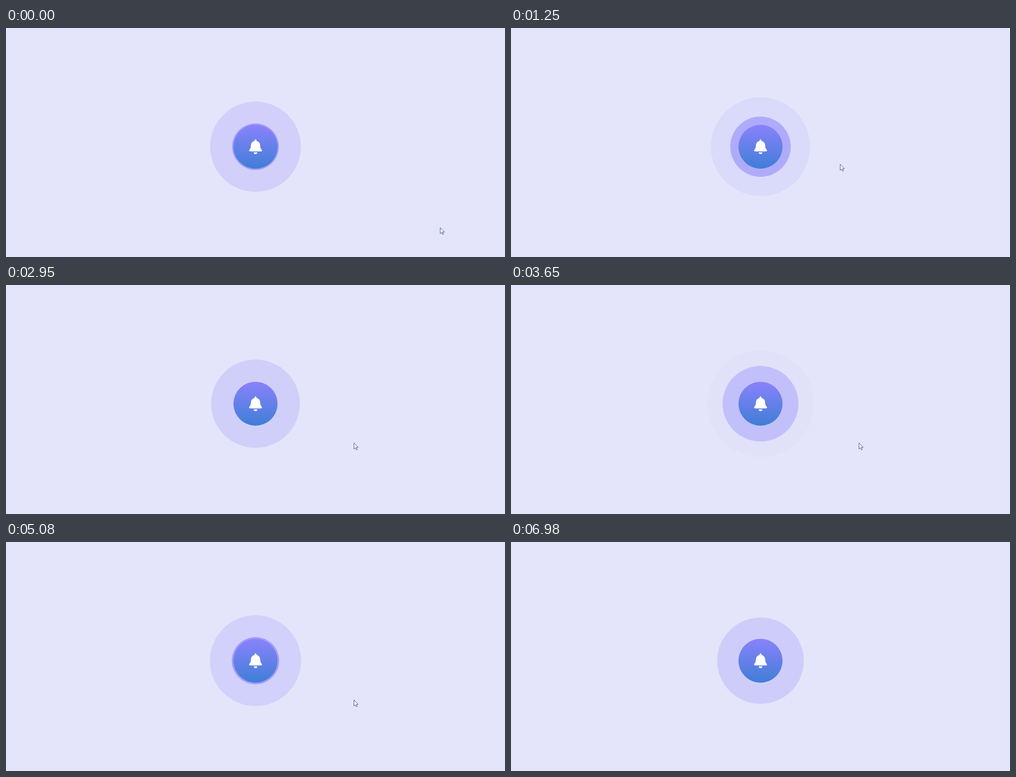
Recreate the animation shown at these times as an HTML page. Size 1102 by 508 pixels, loop 7.05 s.

```html
<!DOCTYPE html>
<html lang="en">
<head>
<meta charset="utf-8">
<title>Notification bell</title>
<style>
  html, body { margin: 0; width: 100%; height: 100%; overflow: hidden; background: #e4e5fa; }
  svg { display: block; width: 100%; height: 100%; }
</style>
</head>
<body>
<svg viewBox="0 0 1102 508">
  <defs>
    <linearGradient id="fill" x1="0" y1="0" x2="0" y2="1">
      <stop offset="0" stop-color="#8a82fb"/>
      <stop offset="1" stop-color="#407ed7"/>
    </linearGradient>
  </defs>
  <rect width="1102" height="508" fill="#e4e5fa"/>
  <g fill="#8a82fb">
    <circle class="pulse" cx="551" cy="263.3"/>
    <circle class="pulse" cx="551" cy="263.3"/>
  </g>
  <circle cx="551" cy="263.3" r="48.6" fill="url(#fill)"/>
  <path fill="#fff" transform="translate(536.8 247.1) scale(.0638)"
    d="M224 512c35 0 64-29 64-64H160c0 35 29 64 64 64z
       M439 362c-19-21-55-52-55-154 0-78-54-140-128-155V32c0-18-14-32-32-32s-32 14-32 32v21
       C118 68 64 130 64 208c0 102-36 133-55 154-6 6-9 14-9 22 0 16 13 32 32 32h384
       c19 0 32-16 32-32 0-8-3-16-9-22z"/>
  <ellipse id="glow" cx="1086" cy="509" rx="6" ry="3.5" fill="#efe9cf"/>
  <path id="cursor" fill="#fff" stroke="#384478" stroke-width="1" stroke-linejoin="round"
    d="M0 .5V13.8L3.1 11 5.2 15.6 7.3 14.7 5.2 10.1H9.3Z"/>
</svg>
<script>
const LOOP = 7050, STEP = 68.2, LEAD = 60;
const START_RADIUS = 48.5, GROWTH = 1.5, START_ALPHA = 0.7;
const PULSE_STEPS = 29.92, PULSE_LEAD = 0.025;

// Pointer stages, in steps
const ORBIT = 11, LEAVE = 29, EXIT = 91, GLIDE = 10;
const ENTRY = [959, 442.5], BEND = [900, 95], REST = [768.5, 350], GONE = [1084, 510];

const pulses = document.querySelectorAll(".pulse");
const cursor = document.getElementById("cursor");
const glow = document.getElementById("glow");

const mix = (a, b, u) => a.map((v, i) => v + (b[i] - v) * u);
const smooth = u => u * u * (3 - 2 * u);
const glide = (a, b, steps) => mix(a, b, smooth(Math.min(1, steps / GLIDE)));

// cubic-bezier(0, 0, .58, 1)
function easeOut(x) {
  let lo = 0, hi = 1;
  for (let i = 0; i < 24; i++) {
    const s = (lo + hi) / 2;
    if (1.74 * s * s - 0.74 * s * s * s < x) lo = s; else hi = s;
  }
  return smooth(lo);
}

// Counter-clockwise laps around the bell, the first one taller
function orbit(step) {
  const angle = (24.5 - 30.76 * (step - 19)) * Math.PI / 180;
  const height = 130.6 + 4 * Math.max(0, 19 - step);
  return [556 + 188 * Math.cos(angle), 247.8 + height * Math.sin(angle)];
}

function pointer(step) {
  if (step < ORBIT) {
    const u = step / ORBIT;
    return mix(mix(ENTRY, BEND, u), mix(BEND, orbit(ORBIT), u), u);
  }
  if (step < LEAVE) return orbit(step);
  if (step < EXIT) return glide(orbit(LEAVE), REST, step - LEAVE);
  return glide(REST, GONE, step - EXIT);
}

function draw(t) {
  const step = Math.floor((t + LEAD) / STEP);
  pulses.forEach((pulse, i) => {
    const p = easeOut((PULSE_LEAD + step / PULSE_STEPS + i / 2) % 1);
    pulse.setAttribute("r", START_RADIUS * (1 + GROWTH * p));
    pulse.setAttribute("opacity", START_ALPHA * (1 - p));
  });
  cursor.setAttribute("transform", `translate(${pointer(step)})`);
  glow.setAttribute("visibility", step >= EXIT + GLIDE ? "visible" : "hidden");
}

const begin = performance.now();
function tick() {
  draw((performance.now() - begin) % LOOP);
  requestAnimationFrame(tick);
}
tick();
</script>
</body>
</html>
```
